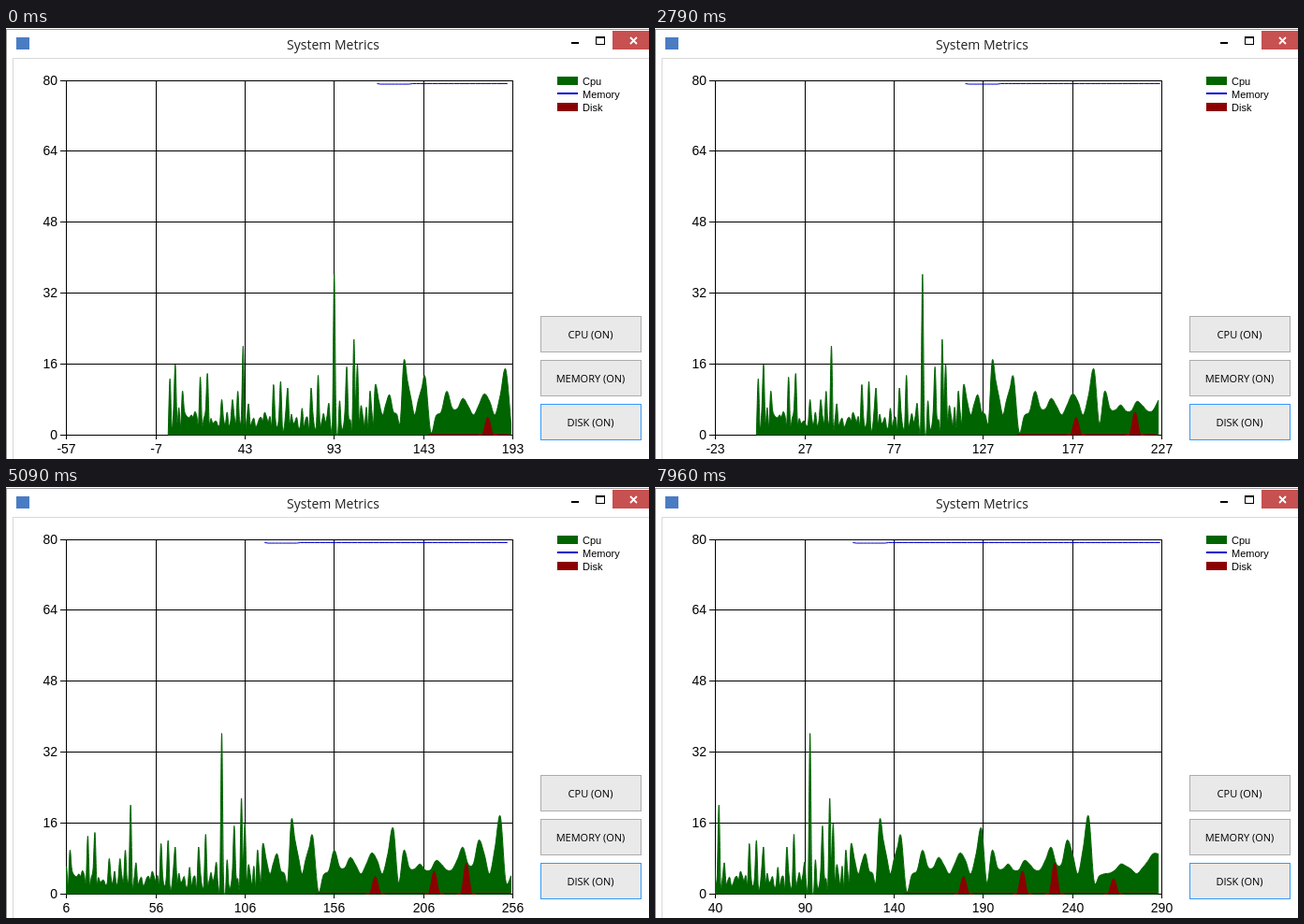
These frames come from a looping animation (687x461 px, 8000 ms). An HTML page:

```html
<!DOCTYPE html>
<html lang="en">
<head>
<meta charset="utf-8">
<title>System Metrics</title>
<style>
  html, body { margin: 0; width: 100%; height: 100%; overflow: hidden; background: #fff; }
  svg { display: block; }
  .ui { font-family: "Open Sans", "Noto Sans", sans-serif; text-anchor: middle; }
  .title { font-size: 14px; fill: #222; }
  .btn text { font-size: 11px; }
  .btn rect { fill: #e9e9e9; stroke: #acacac; }
  .btn .focus { stroke: #3399ff; }
  .legend, .axis { font-family: "Liberation Sans", Arial, sans-serif; }
  .legend { font-size: 11px; }
  .axis { font-size: 14px; }
  .grid { stroke: #000; fill: none; shape-rendering: crispEdges; }
  .series { stroke-linejoin: round; }
</style>
</head>
<body>
<svg width="687" height="461" viewBox="0 0 687 461">
  <defs><clipPath id="plot"><rect x="64" y="56" width="478" height="380"/></clipPath></defs>
  <rect width="687" height="461" fill="#fff"/>
  <path d="M0 1.5H687M.5 1V461" stroke="#999" shape-rendering="crispEdges"/>
  <path d="M687 32.5H7.5V461" stroke="#d9d9d9" fill="none" shape-rendering="crispEdges"/>

  <rect x="11" y="10" width="14" height="13" fill="#4a7cc4"/>
  <text class="ui title" x="349.5" y="23">System Metrics</text>
  <path d="M604 15h8v2h-8z"/>
  <path d="M630 9h10v9h-10zM631 11v6h8v-6z" fill-rule="evenodd"/>
  <rect x="648" y="3" width="39" height="20" fill="#c75050"/>
  <path d="M667 10l7 7m0-7l-7 7" stroke="#fff" stroke-width="1.8"/>

  <path id="grid" class="grid"/>
  <g class="series" clip-path="url(#plot)">
    <path id="cpu" fill="#006400" stroke="#006400"/>
    <path id="disk" fill="#8b0000" stroke="#8b0000"/>
    <path id="memory" fill="none" stroke="#0000cd"/>
  </g>
  <g id="labels" class="axis"></g>

  <g class="legend">
    <rect x="589" y="52" width="22" height="9" fill="#006400"/>
    <rect x="589" y="69" width="22" height="2" fill="#0000cd"/>
    <rect x="589" y="80" width="22" height="9" fill="#8b0000"/>
    <text x="616" y="61">Cpu</text>
    <text x="616" y="75">Memory</text>
    <text x="616" y="89">Disk</text>
  </g>

  <g class="ui btn">
    <rect x="571.5" y="308.5" width="107" height="38"/>
    <rect x="571.5" y="355.5" width="107" height="38"/>
    <rect class="focus" x="571.5" y="402.5" width="107" height="38"/>
    <text x="624.5" y="332">CPU (ON)</text>
    <text x="624.5" y="379">MEMORY (ON)</text>
    <text x="624.5" y="426">DISK (ON)</text>
  </g>
</svg>
<script>
const LOOP = 8000, DELAY = 50, STEP = 135.5, SPAN = 250, END = 290;
const LEFT = 64.5, RIGHT = 541.5, TOP = 56.5, BASE = 435.5;
const MEMORY_FROM = 117, DISK_FROM = 146;
const $ = id => document.getElementById(id);

// [redraws so far, sample counter]
const counts = [[0, 193], [9, 209], [20, 227], [27, 238], [37, 256], [49, 275], [58, 290]];

// Main turning points of the load; the rest is filled in by load().
const cpuKeys = {
  0: 0, 1: 12.6, 4: 15.8, 8: 9.8, 18: 13, 22: 13.8, 39: 9.8, 42: 20, 59: 11.3, 63: 12,
  67: 10.5, 80: 10.5, 84: 13.4, 93: 36.2, 95: 0, 100: 15.3, 104: 21.5, 106: 15.8,
  113: 9.8, 116: 11.3, 124: 9, 130: 3, 132: 16.7, 144: 12.9, 147: .7, 156: 9.8,
  165: 8.2, 177: 9.2, 189: 14.8, 192: 2.5, 195: 9.8, 204: 6.7, 213: 7.5, 228: 10.5,
  237: 12.1, 249: 17.5, 252: 3, 267: 6.7, 285: 9
};
const diskKeys = { 179: 3.8, 212: 5, 230: 6.8, 263: 3.3 };
const cpuPairs = Object.entries(cpuKeys).map(([x, v]) => [+x, v]);

const mix = (a, b, u) => a + (b - a) * u;

// Value at v, and how far v lies between its two neighbours
function lookup(table, v) {
  let i = 1;
  while (i < table.length - 1 && v > table[i][0]) i++;
  const [a, p] = table[i - 1], [b, q] = table[i];
  const u = Math.min(1, (v - a) / (b - a));
  return [mix(p, q, u), u];
}

function random(seed) {
  const r = Math.sin(seed * 12.9898) * 43758.5453;
  return r - Math.floor(r);
}

function load(x) {
  if (x in cpuKeys) return cpuKeys[x];
  if (x < MEMORY_FROM) return x % 3 ? 1.5 + 3 * random(x) : 3 + 5 * random(x);
  const [v, u] = lookup(cpuPairs, x);
  return mix(4.5, v, Math.abs(2 * u - 1));
}

// The series share one counter, so each gets sparser as others join.
const gap = x => x < 144 ? 2 : 3;
const cpu = [], memory = [], disk = [];
for (let x = 0; x < END; x += x < 116 ? 1 : gap(x)) cpu.push([x, load(x)]);
for (let x = MEMORY_FROM; x < END; x += gap(x - 1))
  memory.push([x, x > MEMORY_FROM && x < 137 ? 79.25 : 79.37]);
for (let x = DISK_FROM; x < END; x += 3) disk.push([x, diskKeys[x] || 0]);

// Cardinal spline, tension 0.5
function spline(pts) {
  const at = i => pts[Math.max(0, Math.min(pts.length - 1, i))];
  let d = "M" + pts[0];
  for (let i = 0; i < pts.length - 1; i++) {
    const a = at(i - 1), b = at(i), c = at(i + 1), e = at(i + 2);
    const c1 = b.map((v, k) => v + (c[k] - a[k]) / 6);
    const c2 = c.map((v, k) => v - (e[k] - b[k]) / 6);
    d += `C${c1} ${c2} ${c}`;
  }
  return d;
}

function place(series, max, base) {
  return series.filter(p => p[0] < max).map(([x, v]) => [
    LEFT + (x - max + SPAN) * (RIGHT - LEFT) / SPAN,
    base - v * (BASE - TOP) / 80
  ]);
}

function area(series, max, base) {
  const pts = place(series, max, base);
  return `${spline(pts)}V${base}H${pts[0][0]}Z`;
}

function label(x, y, anchor, text) {
  const el = document.createElementNS("http://www.w3.org/2000/svg", "text");
  el.setAttribute("x", x);
  el.setAttribute("y", y);
  el.setAttribute("text-anchor", anchor);
  el.textContent = text;
  $("labels").append(el);
  return el;
}

let gridPath = "";
const xLabels = [];
for (let i = 0; i <= 5; i++) {
  const y = Math.floor(TOP + i * 75.8 - .4) + .5;
  const x = Math.floor(LEFT + i * 95.4 + .15) + .5;
  gridPath += `M58 ${y}H542M${x} 56V440`;
  label(55, y + 4, "end", 80 - 16 * i);
  xLabels.push(label(x, 455, "middle", ""));
}
$("grid").setAttribute("d", gridPath);

function draw(max) {
  xLabels.forEach((el, i) => el.textContent = max - SPAN + 50 * i);
  $("cpu").setAttribute("d", area(cpu, max, 435));
  $("disk").setAttribute("d", area(disk, max, 434.5));
  $("memory").setAttribute("d", "M" + place(memory, max, BASE).join("L"));
}

let shown = -1;
function tick() {
  const t = performance.now() % LOOP;
  const step = Math.max(0, Math.floor((t - DELAY) / STEP));
  if (step !== shown) {
    shown = step;
    draw(Math.round(lookup(counts, step)[0]));
  }
  requestAnimationFrame(tick);
}
tick();
</script>
</body>
</html>
```
